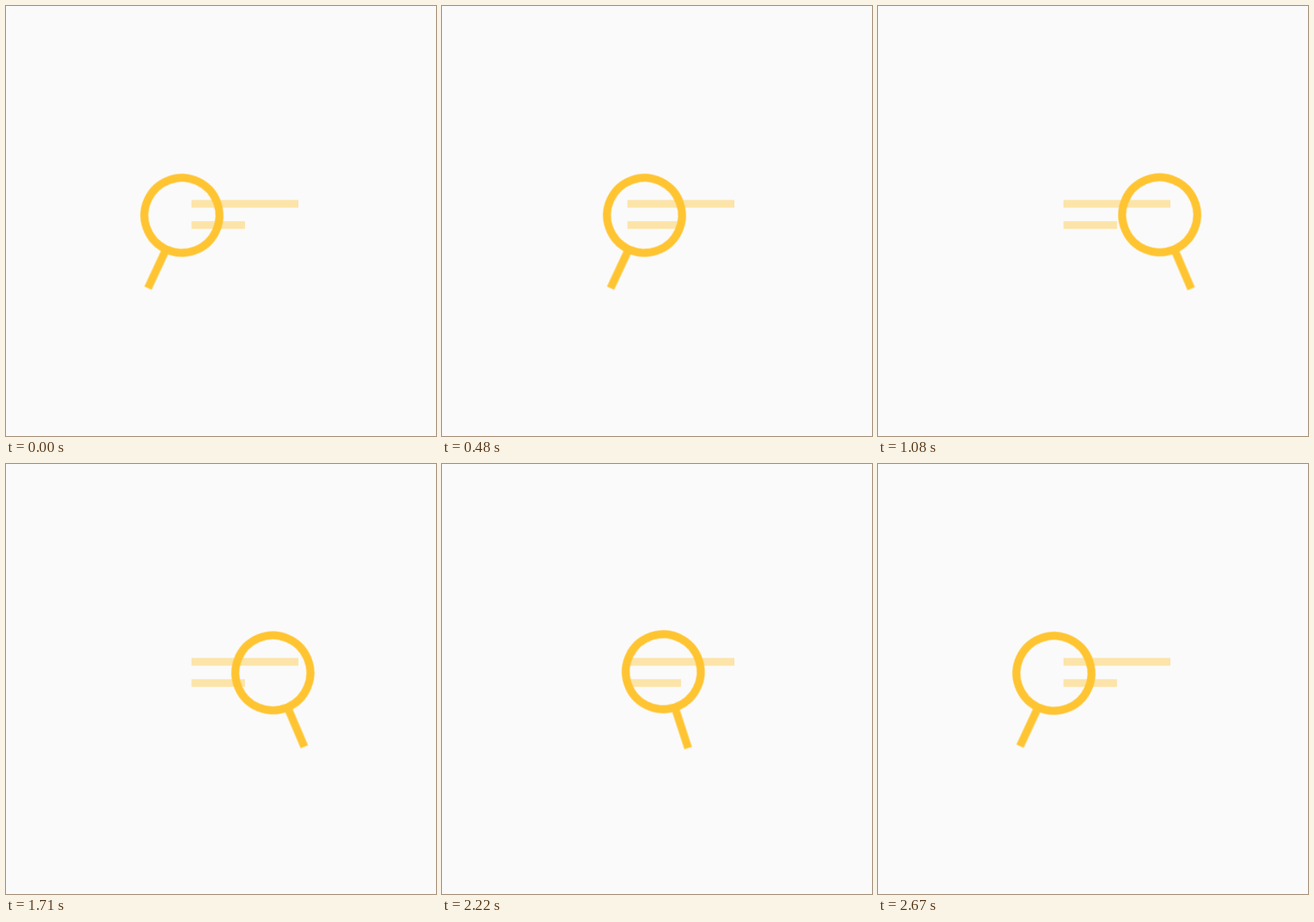
Recreate the animation shown at these times as an HTML page without scripts. Size 500 by 500 pixels, loop 3630 ms.

```html
<!DOCTYPE html>
<html lang="en">
<head>
<meta charset="utf-8">
<title>Searching</title>
<style>
  html, body {
    margin: 0;
    width: 100%;
    height: 100%;
    overflow: hidden;
    background: #fafafa;
  }
  svg { display: block; width: 100%; height: 100%; }

  .lines { fill: #ffc431; opacity: .4; }
  .lens { fill: none; stroke: #ffc431; stroke-width: 9.2; }

  .slide, .tilt {
    animation: 3630ms cubic-bezier(.72, 0, .62, 1) infinite;
    transform-origin: 0 0;
  }
  .slide { animation-name: slide; }
  .tilt { animation-name: tilt; }

  @keyframes slide {
    0%, 73.829%, 100% { transform: translate(186.8px, 281.5px); }
    29.752%, 39.669% { transform: translate(344px, 281.5px); }
    54.545% { transform: translate(280px, 281.5px); }
  }
  @keyframes tilt {
    0%, 16.116%, 73.829%, 100% { transform: rotate(25deg); }
    29.752%, 54.545% { transform: rotate(-23.1deg); }
  }
</style>
</head>
<body>
<svg viewBox="0 0 500 500">
  <g class="lines">
    <rect x="215.7" y="225.5" width="124.3" height="9"/>
    <rect x="215.7" y="250.2" width="62.2" height="9"/>
  </g>
  <!-- The lens pivots near the top of its handle. -->
  <g class="slide">
    <g class="tilt lens">
      <circle cy="-42" r="43.6"/>
      <path d="M0 2V51.4"/>
    </g>
  </g>
</svg>
</body>
</html>
```
